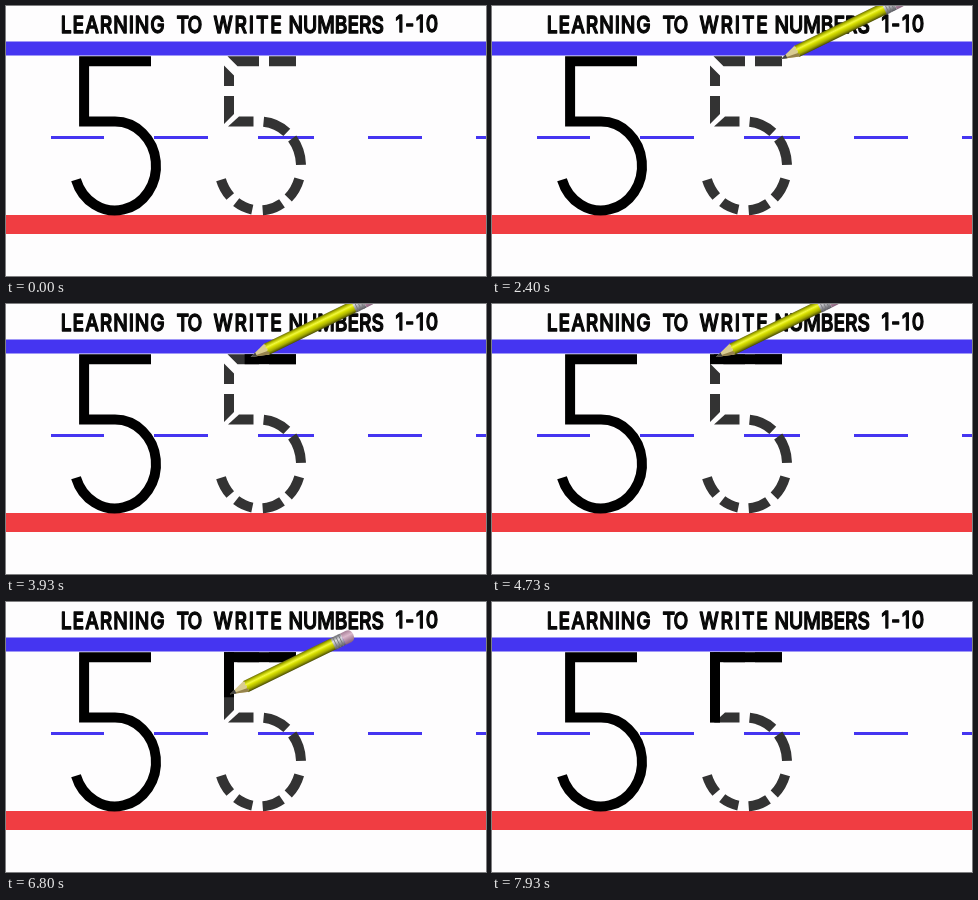
Animation of 480 by 270 pixels, one loop 8000 ms. Source, as an HTML page:

```html
<!DOCTYPE html>
<html lang="en">
<head>
<meta charset="utf-8">
<title>Learning to write numbers</title>
<style>
  html, body { margin: 0; width: 100%; height: 100%; overflow: hidden; background: #fefdfe; }
  svg { display: block; width: 100%; height: 100%; }
  .title { font: 500 23.5px Inter, "Open Sans", sans-serif; fill: #080808; stroke: #080808; stroke-width: 1.3; stroke-linejoin: round; }
  .five { fill: none; stroke: #000; stroke-width: 10; }
</style>
</head>
<body>
<svg viewBox="0 0 480 270">
  <defs>
    <linearGradient id="paint" x2="0" y2="1">
      <stop offset="0" stop-color="#6c6e08"/>
      <stop offset=".18" stop-color="#bcc400"/>
      <stop offset=".36" stop-color="#f2f83c"/>
      <stop offset=".52" stop-color="#d6de00"/>
      <stop offset=".76" stop-color="#a4aa00"/>
      <stop offset="1" stop-color="#484a04"/>
    </linearGradient>
    <linearGradient id="metal" x2="0" y2="1">
      <stop offset="0" stop-color="#66666c"/>
      <stop offset=".35" stop-color="#dedee2"/>
      <stop offset="1" stop-color="#55555c"/>
    </linearGradient>
    <linearGradient id="rubber" x2="0" y2="1">
      <stop offset="0" stop-color="#a57f96"/>
      <stop offset=".4" stop-color="#dcb8cc"/>
      <stop offset="1" stop-color="#86607a"/>
    </linearGradient>
  </defs>

  <!-- condensed lettering -->
  <g class="title" transform="scale(.82 1)">
    <text x="66.8" y="26.9" letter-spacing="1.15">LEARNING</text>
    <text x="208" y="26.7" letter-spacing="-1.2">TO</text>
    <text x="253" y="27" letter-spacing="2.2">WRITE</text>
    <text x="344.5" y="27">NUMBERS</text>
    <text x="475" y="26.2" letter-spacing="2.2">1-10</text>
  </g>

  <path fill="#4535f1" d="M0 35.4H480V49.5H0z"/>
  <path fill="#f03d42" d="M0 209H480V228H0z"/>
  <path stroke="#4535f1" stroke-width="3" d="M45 131.5H98M148 131.5H202M252 131.5H308M362 131.5H416M470 131.5H480"/>

  <path class="five" d="M145 55.2H78.1V115.6H109A41 44.4 0 1 1 70 173.7"/>

  <g fill="#333">
    <path d="M263 50.2H290V60.2H263zM221.5 50.2H253V60.2H231.5z"/>
    <path d="M218 59.5L228 69.5V80H218zM218 90H228V108L218 118z"/>
    <path d="M222 120.6L233 110.6H247.5V120.6z"/>
    <path fill="none" stroke="#333" stroke-width="10" pathLength="247"
      stroke-dasharray="35 11 38 19 30 11 28 14 24 11 26 20"
      d="M257.6 115.7A41 44.4 0 1 1 215 173.7"/>
  </g>
  <rect id="bar" y="50.2" height="10"/>
  <rect id="stem" x="218" y="50.2" width="10"/>

  <g id="pencil">
    <path fill="#d9cc92" d="M0 0L18 -5.8L20 0L18 5.8z"/>
    <path fill="#96834c" d="M0 0L18 5.8L19 2z"/>
    <path fill="#444" d="M0 0L6 -2V2z"/>
    <path fill="url(#paint)" d="M17 -5.8H114V5.8H17Q20 3.8 17 2Q20 0 17 -2Q20 -3.8 17 -5.8z"/>
    <path fill="url(#metal)" d="M113 -6H124V6H113z"/>
    <path stroke="#77777d" stroke-width=".8" d="M115.5 -6V6M118.5 -6V6M121.5 -6V6"/>
    <path fill="url(#rubber)" d="M124 -6H130Q135 -5.5 135 0Q135 5.5 130 6H124z"/>
  </g>
</svg>
<script>
const LOOP = 8000;
const [bar, stem, pencil] = ["bar", "stem", "pencil"].map(id => document.getElementById(id));
const progress = (t, start, end) => Math.min(1, Math.max(0, (t - start) / (end - start)));

function draw(t) {
  const across = progress(t, 2450, 4620);
  const down = progress(t, 5730, 7530);
  const tipX = 289 - 65 * across;
  const tipY = 53 + 66 * down;

  const left = across ? Math.max(218, tipX - 6) : 290;
  bar.setAttribute("x", left);
  bar.setAttribute("width", 290 - left);
  stem.setAttribute("height", down ? Math.min(70.4, tipY - 47.2) : 0);

  pencil.setAttribute("transform", `translate(${tipX} ${tipY}) rotate(-26) scale(1.015 1.06)`);
  pencil.setAttribute("visibility", t >= 1270 && t < 7700 ? "visible" : "hidden");
}

function frame() {
  draw(performance.now() % LOOP);
  requestAnimationFrame(frame);
}
frame();
</script>
</body>
</html>
```
